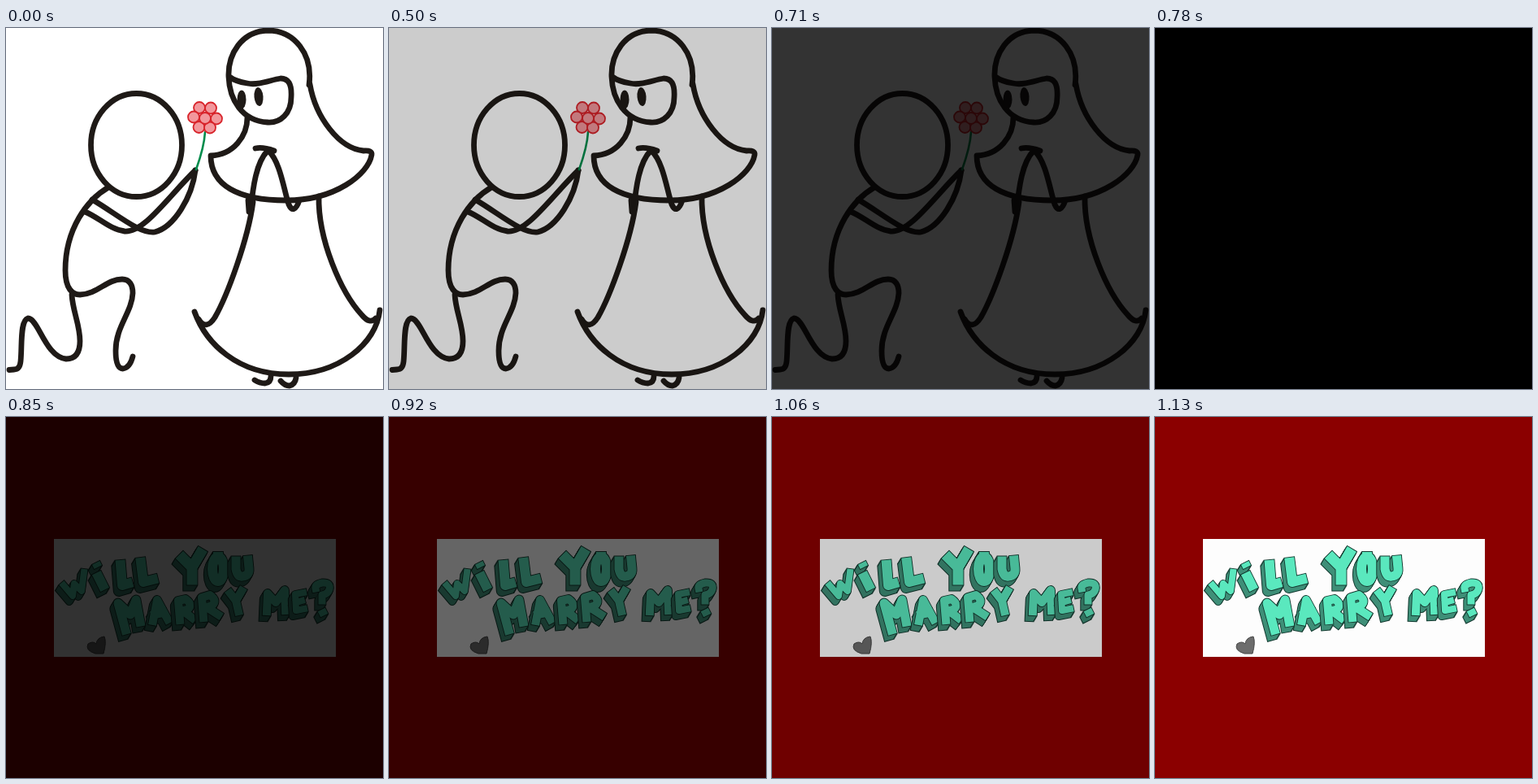
An HTML page for the animation above (1.63 s loop, 464x444 px).

```html
<!DOCTYPE html>
<html lang="en">
<head>
<meta charset="utf-8">
<title>Will you marry me?</title>
<style>
  html, body { margin: 0; width: 100%; height: 100%; overflow: hidden; background: #000; }
  svg { display: block; width: 100%; height: 100%; }
  #couple { fill: none; stroke: #1f1a17; stroke-width: 6.8; stroke-linecap: round; stroke-linejoin: round; }
  #eyes { fill: #1f1a17; stroke: none; }
  #petals { fill: #f2979c; stroke: #d8232a; stroke-width: 1.8; }
  #lettering { fill: none; stroke-linecap: square; stroke-linejoin: round; }
</style>
</head>
<body>
<svg viewBox="0 0 464 444" role="img" aria-label="Will you marry me?">
  <g id="proposal">
    <rect width="464" height="444" fill="#fff"/>
    <g id="couple">
      <!-- kneeling man -->
      <ellipse cx="160.5" cy="144" rx="56" ry="63.5"/>
      <path d="M126 196C100 211 73 247 73 298C73 321 82 328 91 328C113 327 124 309 143 309C152 309 156 316 156 326C155 350 135 367 135 397C135 412 138 419 144 419C150 418 154 412 156 404"/>
      <path d="M81 328C82 348 91 365 91 385C91 400 85 407 74 407C48 404 40 357 27 357C17 360 20 390 18 410Q17 420 10 420L4 420.5"/>
      <path d="M106 211C125 222 143 236 160 245C170 250 176 252 183 251C207 245 229 208 233 175"/>
      <path d="M97 226C113 232 128 248 146 250C170 252 200 207 233 175"/>
      <!-- flower -->
      <path d="M245 128C244 145 239 160 234 174" stroke="#008c4c" stroke-width="2.6"/>
      <g id="petals"></g>
      <!-- woman -->
      <path d="M373 70C378 32 355 3 322 3C290 4 273 32 274 60C275 88 290 114 322 116C338 117 351 105 351 85C352 68 347 62 338 62C325 64 310 71 297 68C285 66 280 64 275 60"/>
      <path d="M374 69C381 110 410 148 440 151Q451 150 450 156C446 180 405 212 345 212C285 212 252 193 252 157C280 156 297 133 297 110"/>
      <g id="eyes">
        <ellipse cx="290" cy="88" rx="5.5" ry="11.5"/>
        <ellipse cx="311" cy="84.5" rx="5.5" ry="11.5" transform="rotate(-5 311 84.5)"/>
      </g>
      <path d="M307 148Q316 146 330 151M322 151C308 165 304 195 301 225M298 212L299 226M323 151C338 165 342 200 348 217C352 226 357 224 361 212"/>
      <path d="M304 214C298 260 272 330 257 356C250 367 243 368 237 358"/>
      <path d="M385 207C384 260 412 325 438 353Q448 365 455 357"/>
      <path d="M232 349C246 388 285 426 348 426C410 426 456 388 460 347"/>
      <path d="M306 433Q312 437 319 437Q326 436 326 428M338 434Q343 440 349 440Q356 438 357 430"/>
    </g>
  </g>
  <g id="question">
    <rect width="464" height="444" fill="#8b0000"/>
    <rect x="59" y="150" width="347" height="145" fill="#fdfdfd"/>
    <g id="lettering"></g>
    <path d="M120 291L110 291Q97 287 101 279Q107 275 111 279Q112 271 121 270Q124 277 120 291Z" fill="#6c6c6c" stroke="#454545"/>
  </g>
  <rect id="shade" width="464" height="444"/>
</svg>
<script>
const $ = id => document.getElementById(id);

const petals = [[238, 98], [252, 98.5], [231, 109.5], [259, 111.5], [237.5, 122], [251, 122.5], [245, 111]];
$('petals').innerHTML = petals.map(([x, y]) => `<circle cx="${x}" cy="${y}" r="7"/>`).join('');

// Each letter: stroke width and centre line.
const letters = [
  [8, 'M71 207L82 220L84 205L93 214L96 191'],
  [6, 'M110 183L114 181'],
  [12, 'M114 197L119 207'],
  [12, 'M141 182L143 207L150 205'],
  [12, 'M166 179L169 203L181 200'],
  [13, 'M218 174L229 185L239 168M229 185L229 200'],
  [12, 'M261 172a7 15 0 0 0 0 30a7 15 0 0 0 0-30'],
  [11, 'M283 177V187Q285 197 291 196Q300 195 299 186L298 176'],
  [11, 'M147 262L138 229L153 243L160 225L165 252'],
  [10, 'M181 251L186 225L199 249M183 243L193 241'],
  [10, 'M214 250L212 226L221 224Q231 231 223 237L214 239M220 240L229 247'],
  [10, 'M243 247L241 222L251 219Q261 226 253 232L244 235M250 236L261 243'],
  [10, 'M276 217L283 226L290 214M283 226L286 239'],
  [10, 'M321 239L322 217L332 228L343 213L344 238'],
  [8, 'M366 216L356 218L357 238L367 236M357 228L364 226'],
  [9, 'M381 211Q380 206 389 204Q400 203 398 212Q396 218 389 219L389 226'],
  [8, 'M389 241L391 240']
];
const line = (d, width, color, depth = 0) =>
  `<path d="${d}" stroke="${color}" stroke-width="${width}" transform="translate(${-depth * 0.6} ${depth})"/>`;
const depths = [7, 6, 5, 4, 3, 2, 1];
const block = ([width, d]) =>
  depths.map(z => line(d, width + 2, '#143a30', z)).join('') +
  depths.map(z => line(d, width, '#3f8f78', z)).join('') +
  line(d, width + 1.8, '#143a30') + line(d, width, '#5ae8be');
$('lettering').innerHTML = letters.map(block).join('');

// Hold the couple, fade to black and up to the question in 70 ms steps, hold.
const LOOP = 1630, HOLD = 500, STEP = 70;
const start = performance.now();

function draw() {
  const time = (performance.now() - start) % LOOP;
  const step = time < HOLD ? 0 : Math.min(10, Math.floor((time - HOLD) / STEP) + 1);
  $('proposal').style.display = step < 5 ? '' : 'none';
  $('question').style.display = step < 5 ? 'none' : '';
  $('shade').style.opacity = 1 - Math.abs(step - 5) / 5;
  requestAnimationFrame(draw);
}
draw();
</script>
</body>
</html>
```
